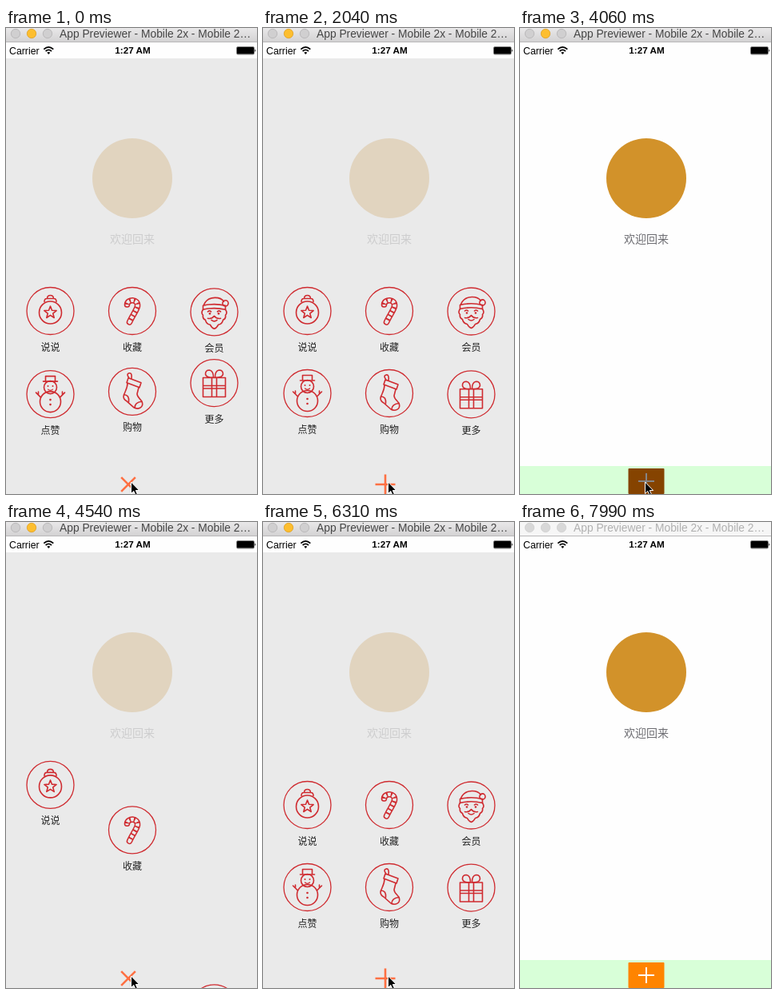
An HTML page for the animation above (8030 ms loop, 314 px wide and 583 px high).

```html
<!DOCTYPE html>
<html lang="zh">
<head>
<meta charset="utf-8">
<style>
  html, body { margin: 0; width: 100%; height: 100%; overflow: hidden; background: #fefefe; }
  svg { display: block; width: 314px; height: 583px; }
  text { font-family: "Liberation Sans", Arial, sans-serif; }
  .cjk { font-family: "Noto Sans CJK SC", "Noto Sans CJK", sans-serif; text-anchor: middle; }
  .item { fill: none; stroke: #cf2b30; stroke-width: 1.6; stroke-linecap: round; stroke-linejoin: round; }
  .item .dot { fill: #cf2b30; stroke: none; }
  .item text { fill: #222; stroke: none; font-size: 12px; }
</style>
</head>
<body>
<svg viewBox="0 0 314 583">
  <defs>
    <linearGradient id="chrome" x2="0" y2="1">
      <stop stop-color="#e9e8e9"/><stop offset="1" stop-color="#d2d1d2"/>
    </linearGradient>
  </defs>
  <rect width="314" height="583" fill="#fefefe"/>

  <circle cx="158" cy="188" r="50" fill="#d2922a"/>
  <text class="cjk" x="158" y="268.5" font-size="14" fill="#6d6d72">欢迎回来</text>

  <g id="toolbar">
    <rect y="548" width="314" height="35" fill="#d8ffd8"/>
    <rect id="button" x="135.5" y="551" width="45" height="32" rx="1"/>
    <path id="buttonPlus" d="M148 567h20M158 557v20" stroke-width="2"/>
  </g>

  <g id="menu">
    <rect y="38" width="314" height="545" fill="#e5e5e5" fill-opacity=".8"/>
    <path id="menuPlus" d="M-12.5 0h25M0 -12.5v25" stroke="#ff7043" stroke-width="2.6"/>
    <g id="items"></g>
  </g>

  <g id="statusBar">
    <rect y="18" width="314" height="20" fill="#fefefe"/>
    <text x="4" y="32.5" font-size="12.3">Carrier</text>
    <g fill="none" stroke="#000" stroke-width="1.7">
      <path d="M47.3 26.6q6 -5.6 12 0M49.6 29q3.7 -3.2 7.4 0"/>
      <path d="M53.3 33l-2 -2.2q2 -1.4 4 0z" fill="#000" stroke="none"/>
    </g>
    <text x="158.5" y="32.3" font-size="11.7" font-weight="bold" text-anchor="middle">1:27 AM</text>
    <rect x="288.5" y="23.5" width="22" height="9.5" rx="1.5" fill="none" stroke="#000" stroke-width=".5"/>
    <rect x="289" y="24" width="21" height="8.5" rx=".8"/>
    <path d="M311.4 26.5q2 1.7 0 3.5z"/>
  </g>

  <g id="titleBar">
    <rect id="chromeFill" width="314" height="18"/>
    <path d="M0 17.5h314" stroke="#b9b8b9"/>
    <g id="lights" stroke-width=".8">
      <circle cx="12" cy="7" r="5.7"/><circle cx="32" cy="7" r="5.7"/><circle cx="52" cy="7" r="5.7"/>
    </g>
    <text id="title" x="67" y="12" font-size="13.8">App Previewer - Mobile 2x - Mobile 2…</text>
  </g>

  <path id="cursor" d="M0 0V14.5L3.3 11.4L5.6 16.6L8 15.6L5.8 10.5H10.2Z" stroke="#fff" stroke-width="1"/>
</svg>

<script>
const LOOP = 8030, STEP = 118.5;
const TRAVEL = 558;       // distance an item rises from below the screen
const RISE_GAP = 115, FALL_GAP = 100;
const $ = id => document.getElementById(id);

const star = Array.from({ length: 10 }, (_, k) => {
  const r = k % 2 ? 3.4 : 8, a = (k / 5 - .5) * Math.PI;
  return `${r * Math.cos(a)},${2 + r * Math.sin(a)}`;
}).join(' ');
const dot = (x, y, r = 1.3) => `<circle class="dot" cx="${x}" cy="${y}" r="${r}"/>`;
const ring = (x, y, r) => `<circle cx="${x}" cy="${y}" r="${r}"/>`;
const line = d => `<path d="${d}"/>`;

const cane = 'M-6.5 -8C-6 -15 7.5 -15.5 6.5 -6C6 -2 0 6 -3.5 14';
const ICONS = [
  ['说说', ring(0, 2, 14) + `<polygon points="${star}"/>` +
    line('M-7.5 -11.5q0 -4 3 -4h9q3 0 3 4M-4 -15.5q0 -4 4 -4t4 4')],
  ['收藏', `<path d="${cane}" stroke-width="7.6"/><path d="${cane}" stroke="#eaeaea" stroke-width="4.6"/>
    <path d="${cane}" stroke-width="6" stroke-linecap="butt" stroke-dasharray="1.8 3.6"/>`],
  ['会员', line('M-14 -8q14 -3.5 28 0v5q-14 -3.5 -28 0zM-13 -9q4 -9 14 -9q8 0 11 5') + ring(14, -11, 3.6) +
    line('M-14 -3q-3 4 0 7q-1 4 3 6q1 5 6 6q2 4 5 5q3 -1 5 -5q5 -1 6 -6q4 -2 3 -6q3 -3 0 -7') +
    line('M-8 8q5 1 8 -3q3 4 8 3M-3.5 10q3.5 3 7 0M-8 -.5q2 -2 4 0M4 -.5q2 -2 4 0') +
    dot(-5.5, 2) + dot(5.5, 2)],
  ['点赞', line('M-9 -16h18M-6 -16v-6.5h12v6.5') + ring(0, -8.5, 8) + ring(0, 9.5, 13) +
    dot(-3, -10, 1) + dot(3, -10, 1) + dot(0, 7) + dot(0, 13) +
    '<path d="M-3 -6q3 2.6 6 0" stroke-width="1.2"/>' +
    line('M-12 4L-18 -2M-15 1v-4M12 4L18 -2M15 1v-4')],
  ['购物', line('M-5 -17L11 -11L9 -5L-7 -11ZM-4 -17q-4 -5 0 -6t3 7') +
    line('M-6 -10.5C-6 -3 -10 1 -11 6Q-11 10 -7 12L2 20C7 23 14 20 12.5 14C12 10 6 8 6 3L8 -5') +
    line('M-10.5 4q7 0 6 9M3 20.5q0 -7 9 -8')],
  ['更多', line('M-14 -6.5h28v24h-28zM-14 3.5h28M-14 7h28M-3 -6.5v24M3 -6.5v24') +
    line('M-1 -7q-9 1 -10 -4q0 -5 5 -5q5 1 5 9M1 -7q9 1 10 -4q0 -5 -5 -5q-5 1 -5 9')]
];

$('items').innerHTML = ICONS.map(([label, art]) =>
  `<g class="item"><circle r="29.5" stroke-width="1.3"/>${art}<text class="cjk" y="49.5">${label}</text></g>`).join('');
const items = [...$('items').children];
const lights = [...$('lights').children];

// Underdamped spring: remaining distance after ms.
function springOffset(ms) {
  if (ms <= 0) return TRAVEL;
  if (ms > 850) return 0;
  const angle = .00826 * ms, damp = .98;
  return TRAVEL * Math.exp(-damp * angle) * (Math.cos(angle) + damp * Math.sin(angle));
}
const fallOffset = ms => ms > 0 ? 27 * (ms / 100) ** 2.2 : 0;

function recorded(t) {
  const base = t < 2040 ? 0 : 2040;
  return base + STEP * Math.floor((t - base + 10) / STEP);
}

const CYCLES = [
  { open: -1074, close: 2020 },
  { open: 4166, close: 6300 }
];
const CLOSE_TIME = 605;

function drawMenu(s) {
  const cycle = CYCLES.find(c => s >= c.open && s < c.close + CLOSE_TIME);
  $('menu').style.display = cycle ? '' : 'none';
  $('toolbar').style.display = cycle ? 'none' : '';
  if (!cycle) return;
  const rise = s - cycle.open, fall = s - cycle.close;
  const turn = fall >= 0 ? 0 : 45 * Math.sin(Math.min(1, rise / 300) * Math.PI / 2);
  $('menuPlus').setAttribute('transform', `translate(153 571) rotate(${turn})`);
  items.forEach((item, i) => {
    const col = i % 3, row = Math.floor(i / 3);
    const offset = springOffset(rise - i * RISE_GAP) + fallOffset(fall - (5 - i) * FALL_GAP);
    const y = 354 + 103 * row + (col === 2 ? .5 : 0) + offset;
    item.setAttribute('transform', `translate(${[55.5, 158, 260.5][col]} ${y})`);
  });
}

function drawButton(pressed) {
  $('button').setAttribute('fill', pressed ? '#854300' : '#ff8400');
  $('buttonPlus').setAttribute('stroke', pressed ? '#858587' : '#fff');
}

function drawTitle(active) {
  $('chromeFill').setAttribute('fill', active ? 'url(#chrome)' : '#f6f6f6');
  $('title').setAttribute('fill', active ? '#454545' : '#b0b0b0');
  lights.forEach((light, i) => {
    const yellow = active && i === 1;
    light.setAttribute('fill', yellow ? '#fdbe2f' : active ? '#d0cfd0' : '#d8d8d8');
    light.setAttribute('stroke', yellow ? '#dfa023' : active ? '#b4b3b4' : '#d0d0d0');
  });
}

function drawCursor(s) {
  const x = Math.min(244, 156.5 + .13 * Math.max(0, s - 6700));
  const y = (s > 6800 ? 567 : 568) + 17 * (Math.max(0, s - 7135) / 474) ** 1.5;
  $('cursor').setAttribute('transform', `translate(${x} ${y})`);
}

function draw(t) {
  const s = recorded(t);
  drawMenu(s);
  drawButton(s > 4050 && s < 4166);
  drawCursor(s);
  drawTitle(t < 7990);
}

const start = performance.now();
function frame() {
  draw((performance.now() - start) % LOOP);
  requestAnimationFrame(frame);
}
frame();
</script>
</body>
</html>
```
